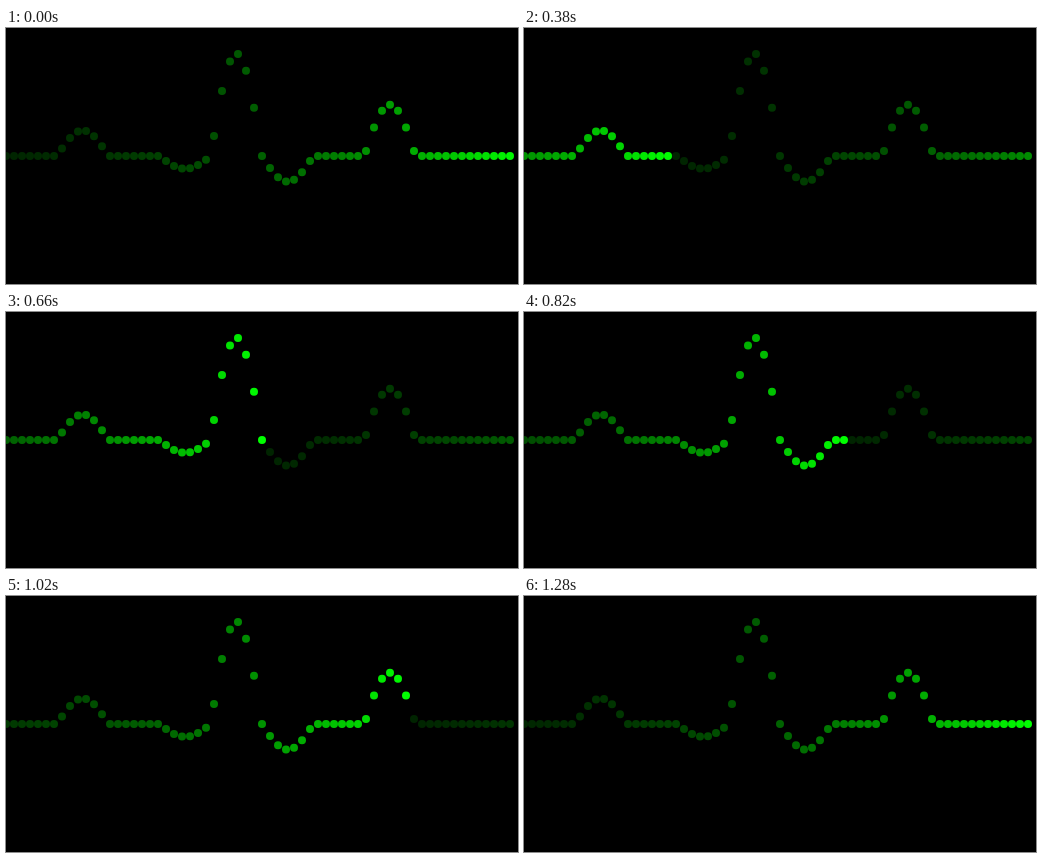
Write an HTML page with a canvas that moves like this. It is 512x256 px and loops after 1320 ms.

```html
<!DOCTYPE html>
<html>
<head>
<meta charset="utf-8">
<title>Heartbeat trace</title>
<style>
  html, body { margin: 0; height: 100%; overflow: hidden; background: #000; }
  canvas { display: block; }
</style>
</head>
<body>
<canvas id="stage" width="512" height="256"></canvas>
<script>
const ctx = document.getElementById('stage').getContext('2d');
const W = 512, H = 256;
const LOOP = 1320, STEP = 20, DOTS = 64, SPACING = 8, RADIUS = 4;
const FADE = 0.97; // brightness kept per step

// Half-sine waves: [start, height] as fractions of the stage, each 0.1 wide
const WAVES = [[0.1, 0.1], [0.3, -0.05], [0.4, 0.4], [0.5, -0.1], [0.7, 0.2]];

function traceY(x) {
  const u = x / W;
  const wave = WAVES.find(([start]) => u >= start && u < start + 0.1);
  const lift = wave ? wave[1] * Math.sin(Math.PI * (u - wave[0]) / 0.1) : 0;
  return H * (0.5 - lift);
}

function draw(now) {
  const step = Math.min(DOTS, Math.floor((now % LOOP) / STEP));
  ctx.fillStyle = '#000';
  ctx.fillRect(0, 0, W, H);
  for (let i = 0; i < DOTS; i++) {
    const age = (step - i + DOTS) % (DOTS + 1);
    const x = i * SPACING;
    ctx.fillStyle = `rgb(0, ${Math.round(255 * FADE ** age)}, 0)`;
    ctx.beginPath();
    ctx.arc(x, traceY(x), RADIUS, 0, 2 * Math.PI);
    ctx.fill();
  }
}

const begin = performance.now();
function tick() {
  draw(performance.now() - begin);
  requestAnimationFrame(tick);
}
tick();
</script>
</body>
</html>
```
